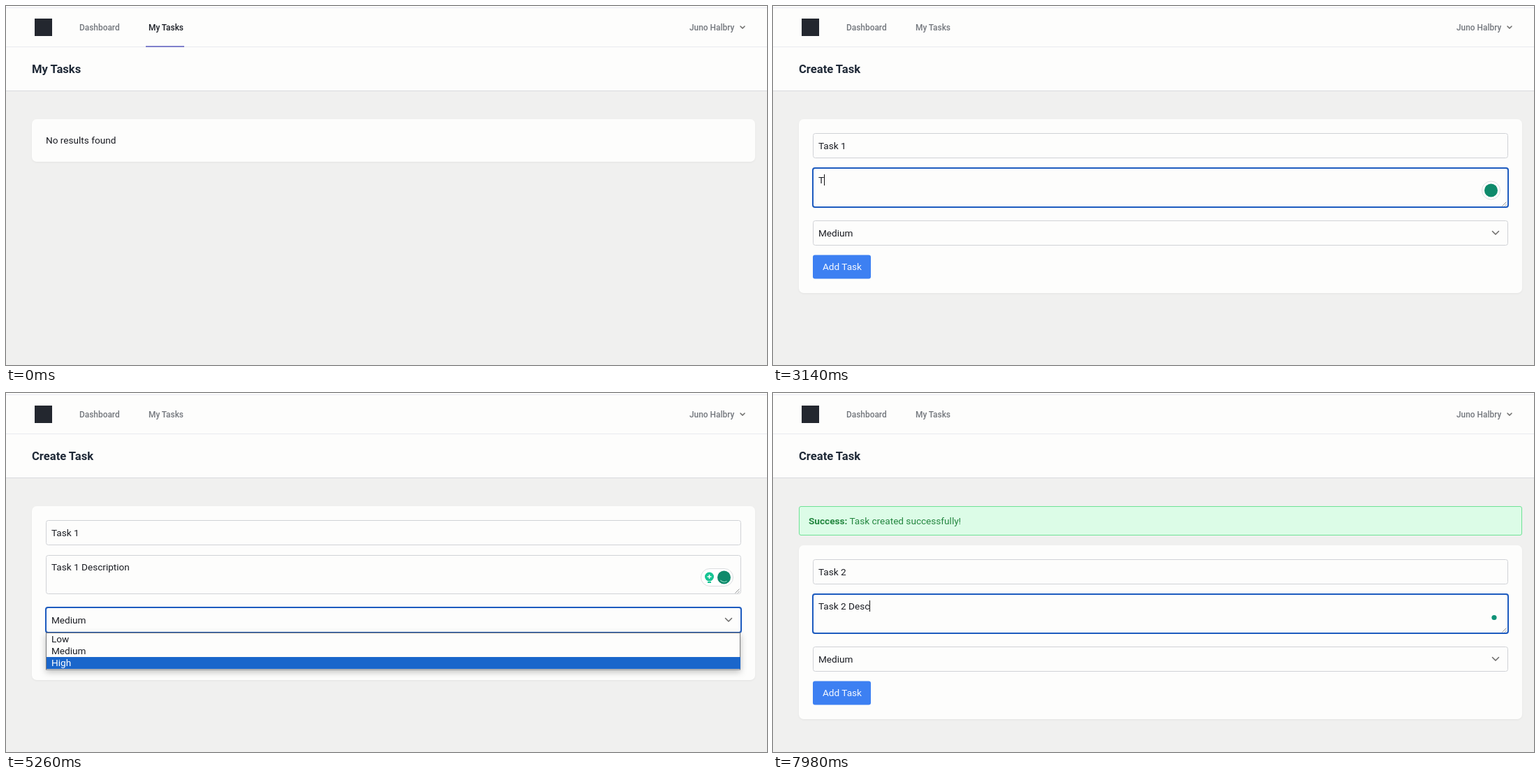
An HTML page that plays this animation: 1089x514 px, repeating every 8000 ms.

```html
<!DOCTYPE html>
<html lang="en">
<head>
<meta charset="utf-8">
<title>Task manager</title>
<style>
  html, body { margin: 0; width: 100%; height: 100%; overflow: hidden; background: #f0f0ef; }
  svg { display: block; width: 100vw; height: 100vh; }
  text { font: 13.6px Roboto, sans-serif; fill: #1a1c22; white-space: pre; }
  .nav { font-size: 11.9px; font-weight: 500; fill: #73777d; }
  .heading { font-size: 16.6px; font-weight: 600; fill: #1f2937; }
  .url { font: 11.3px "Noto Sans", "Open Sans", sans-serif; fill: #33353a; }
  .url.match { fill: #1a56c4; }
  .bold { font-weight: 700; }
  .surface { fill: #fdfdfc; }
  .card { fill: #fdfdfc; filter: drop-shadow(0 1px 1px #0000000d); }
  .field { fill: #fdfdfc; stroke: #d0d2d6; }
  .chevron { fill: none; stroke: #6b6a68; stroke-width: 1.5; stroke-linecap: round; stroke-linejoin: round; }
  .grip { stroke: #85878a; stroke-width: .9; }
  .pill { fill: #fff; stroke: #dcdee0; }
  .hidden { display: none; }
</style>
</head>
<body>
<svg viewBox="0 0 1089 514">
  <defs>
    <linearGradient id="fade" x2="0" y2="1">
      <stop stop-color="#000" stop-opacity=".3"/>
      <stop offset=".35" stop-color="#000" stop-opacity=".12"/>
      <stop offset="1" stop-color="#000" stop-opacity="0"/>
    </linearGradient>
  </defs>
  <rect width="1089" height="514" fill="#f0f0ef"/>
  <rect class="surface" width="1089" height="121"/>
  <path d="M0 2.5H1089" stroke="#eaeaf3"/>
  <path d="M0 58.5H1089" stroke="#e9eaef"/>
  <path d="M0 121.5H1089" stroke="#d9dade"/>
  <rect x="41" y="18" width="25" height="25" fill="#23272f"/>
  <text class="nav" x="105" y="35">Dashboard</text>
  <text class="nav" id="navTasks" x="204" y="35">My Tasks</text>
  <rect id="underline" x="200" y="57" width="55" height="2" fill="#7f80cb"/>
  <text class="nav" x="978" y="34.5">Juno Halbry</text>
  <path class="chevron" d="M1051 29l3 3 3-3"/>
  <text class="heading" id="heading" x="37" y="95.5"></text>

  <g id="list">
    <rect class="card" x="37" y="162" width="1035" height="61" rx="7"/>
    <text x="57" y="197">No results found</text>
  </g>

  <g id="banner">
    <rect x="37.5" y="162.5" width="1034" height="41" rx="2.5" fill="#dcfce7" stroke="#6fe295"/>
    <text x="51" y="187.5" style="fill:#23863f"><tspan class="bold">Success:</tspan> Task created successfully!</text>
  </g>

  <g id="form">
    <rect class="card" x="37" y="162" width="1035" height="249" rx="7"/>
    <rect class="field" x="57.5" y="182.5" width="994" height="35" rx="3"/>
    <rect class="field" x="57.5" y="232.5" width="994" height="55" rx="3"/>
    <rect class="field" x="57.5" y="307.5" width="994" height="35" rx="3"/>
    <rect id="ring" x="57" width="995" rx="3" fill="none" stroke="#1d5bbf" stroke-width="2"/>
    <text id="title" x="65" y="204.5"></text>
    <text id="desc" x="65" y="254"></text>
    <path class="grip" d="M1043.5 286.5l6-6M1047 286.5l2.5-2.5"/>
    <text id="level" x="65" y="329.5"></text>
    <path class="chevron" d="M1029.5 322.5l4.5 4.5 4.5-4.5"/>
    <rect x="57" y="356.5" width="83" height="34" rx="3" fill="#3d80f2"/>
    <text x="71" y="378" style="fill:#f5f8ff">Add Task</text>
    <rect id="caret" width="1" height="16" fill="#111"/>

    <g id="badge">
      <circle class="pill" cx="1027.5" cy="264" r="13"/>
      <circle cx="1027.5" cy="264" r="9.5" fill="#0e8a6b"/>
    </g>
    <circle id="dot" cx="1032" cy="265.5" r="3.6" fill="#0e9277"/>
    <g id="hints">
      <rect class="pill" x="994.5" y="251.5" width="46" height="25" rx="12.5"/>
      <circle cx="1006.5" cy="263" r="6.5" fill="#16c493"/>
      <path d="M1004 271h5" stroke="#16c493" stroke-width="2"/>
      <path d="M1003.5 263h6m-3-3v6" stroke="#fff" stroke-width="1.5"/>
      <circle cx="1027.5" cy="264" r="9.5" fill="#0e8a6b"/>
      <path id="spinner" d="M1027.5 257.5a6.5 6.5 0 0 1 6.5 6.5" fill="none" stroke="#7fd0b6" stroke-width="1.2"/>
    </g>

    <g id="options">
      <rect x="57.5" y="343.5" width="993" height="52.5" fill="#fdfdfc" stroke="#77797c" style="filter:drop-shadow(0 3px 5px #00000040)"/>
      <rect id="highlight" x="58" width="993" height="17" fill="#1a66cb"/>
      <text x="65" y="357">Low</text>
      <text id="medium" x="65" y="374">Medium</text>
      <text id="high" x="65" y="391">High</text>
    </g>
  </g>

  <g id="suggestions">
    <rect y="77" width="1089" height="14" fill="url(#fade)"/>
    <rect class="surface" width="1089" height="77"/>
    <rect y="3" width="1089" height="33" fill="#ececef"/>
    <text class="url match" x="0" y="23"><tspan class="bold" id="typedUrl"></tspan><tspan id="restUrl"></tspan></text>
    <text class="url" x="-1" y="57" id="searchUrl"></text>
  </g>
</svg>
<script>
const LOOP = 8000;
const RINGS = { title: { y: 182, height: 36 }, desc: { y: 232, height: 56 }, select: { y: 307, height: 36 } };
const el = {};
document.querySelectorAll('[id]').forEach(node => el[node.id] = node);

const show = (node, on) => node.classList.toggle('hidden', !on);
const setText = (node, text) => { if (node.textContent !== text) node.textContent = text; };
const between = (t, from, to) => t >= from && t < to;

// First character lands at `start`, the last one at `end`.
function typing(t, text, start, end = start + 1) {
  if (t < start) return '';
  const step = (t - start) / (end - start) * (text.length - 1);
  return text.slice(0, 1 + Math.floor(step + 1e-6));
}

function titleAt(t) {
  if (t < 5820) return typing(t, 'Task ', 2170, 2380) + typing(t, '1', 2550);
  if (t < 6730) return typing(t, 'Tak', 6320, 6490);
  return 'Ta' + typing(t, 'sk 2', 6780, 6930);
}

function descAt(t) {
  if (t >= 5820) return typing(t, 'Task 2 Desc', 7410, 7980);
  return typing(t, 'T', 3100) + typing(t, 'ask 1 Descri', 3340, 4120) + typing(t, 'ption', 4190, 4360);
}

function focusAt(t) {
  if (between(t, 1950, 2750) || between(t, 6090, 7070)) return 'title';
  if (between(t, 2750, 4760) || t >= 7070) return 'desc';
  return between(t, 4760, 5820) ? 'select' : '';
}

function fillField(node, value, placeholder) {
  setText(node, value || placeholder);
  node.style.fill = value ? '' : '#75787d';
}

function drawSuggestions(t) {
  show(el.suggestions, between(t, 720, 1200));
  const path = '/tasks' + typing(t, '/c', 900, 1060);
  setText(el.typedUrl, 'task-manager.test' + path);
  setText(el.restUrl, '/tasks/create'.slice(path.length));
  setText(el.searchUrl, 'ager.test' + path + ' - Quibra Search');
}

function drawFocus(t, focus, value) {
  show(el.ring, focus);
  for (const name in RINGS[focus]) el.ring.setAttribute(name, RINGS[focus][name]);

  const field = el[focus];
  show(el.caret, field && !between(t, 4600, 4760));
  if (!field) return;
  const width = value ? field.getComputedTextLength() : 0;
  el.caret.setAttribute('x', Math.round(65 + width));
  el.caret.setAttribute('y', focus === 'title' ? 192 : 241);
}

function drawHelper(t) {
  const fade = t < 5000 ? (t - 3030) / 110 : (t - 7410) / 110;
  show(el.badge, between(t, 3030, 3340) || between(t, 7410, 7620));
  el.badge.setAttribute('opacity', Math.max(0, Math.min(1, fade)));
  show(el.dot, between(t, 3340, 4760) || t >= 7620);
  show(el.hints, between(t, 4760, 5820));
  el.spinner.setAttribute('transform', `rotate(${(t - 4960) / 760 * 360} 1027.5 264)`);
}

function drawSelect(t) {
  const pickHigh = between(t, 5240, 5820);
  show(el.options, between(t, 4800, 5480));
  el.highlight.setAttribute('y', pickHigh ? 378 : 361);
  el.medium.style.fill = pickHigh ? '' : '#fff';
  el.high.style.fill = pickHigh ? '#fff' : '';
  setText(el.level, between(t, 5480, 5820) ? 'High' : 'Medium');
}

function draw(t) {
  const creating = t >= 1780, saved = t >= 5820;
  setText(el.heading, creating ? 'Create Task' : 'My Tasks');
  el.navTasks.style.fill = creating ? '' : '#1b1e25';
  show(el.underline, !creating);
  show(el.list, !creating);
  show(el.form, creating);
  show(el.banner, saved);
  el.form.setAttribute('transform', `translate(0 ${saved ? 56 : 0})`);

  const focus = focusAt(t), values = { title: titleAt(t), desc: descAt(t) };
  fillField(el.title, values.title, 'Task Title');
  fillField(el.desc, values.desc, 'Task Description');

  drawSuggestions(t);
  drawFocus(t, focus, values[focus]);
  drawHelper(t);
  drawSelect(t);
}

const startTime = performance.now();
function tick() {
  draw((performance.now() - startTime) % LOOP);
  requestAnimationFrame(tick);
}
tick();
</script>
</body>
</html>
```
